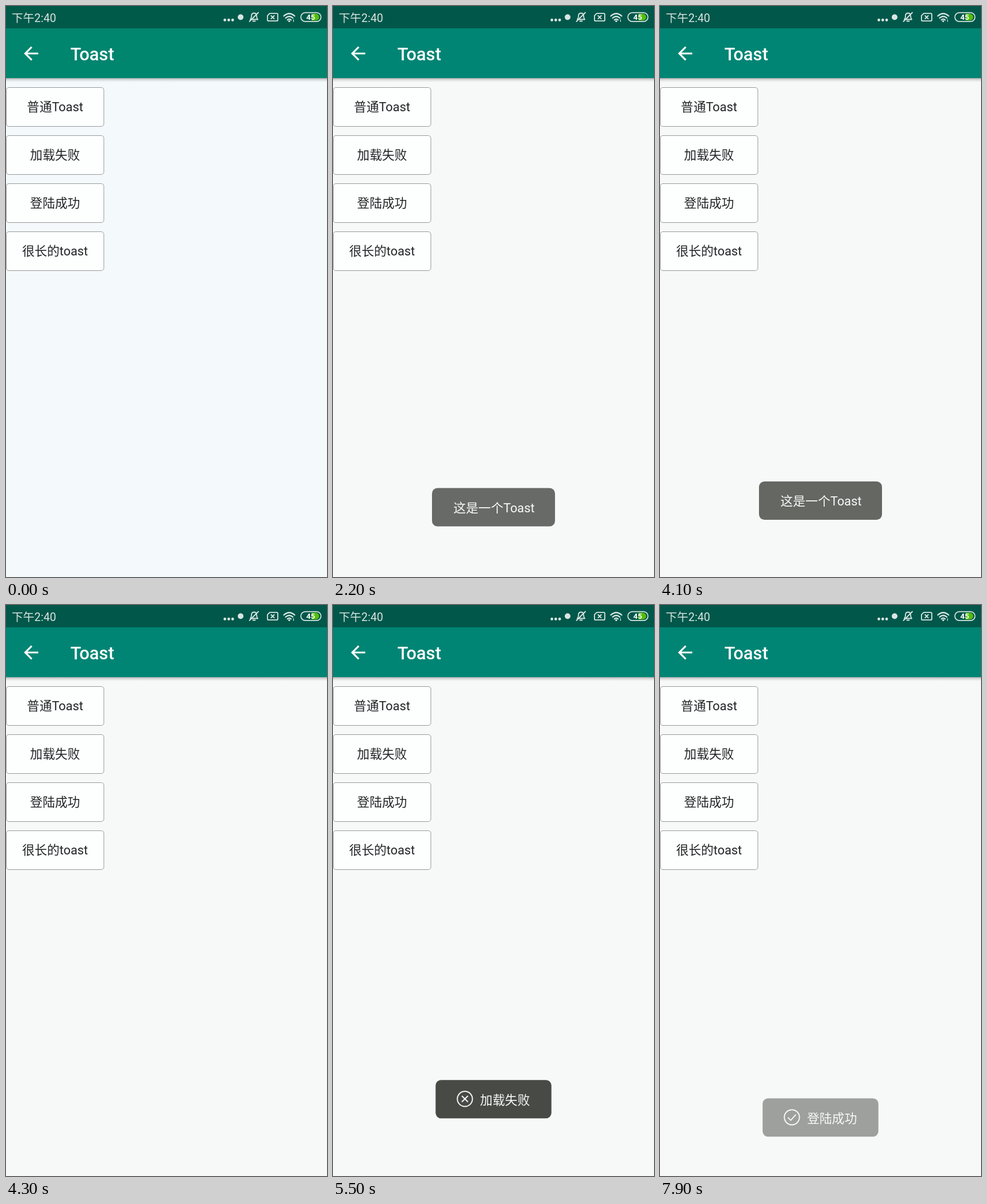
An HTML page for the animation above (8000 ms loop, 561 px wide and 998 px high).

```html
<!DOCTYPE html>
<html lang="zh-CN">
<head>
<meta charset="utf-8">
<title>Toast</title>
<style>
  html, body { margin: 0; width: 100%; height: 100%; overflow: hidden; }
  svg { display: block; width: 561px; height: 998px; }
  text { font: 21.8px Roboto, "Noto Sans CJK SC", "Noto Sans CJK", sans-serif; }
  .label { fill: #222426; text-anchor: middle; }
  .face { fill: #fdfffe; stroke: #979998; }
  .toast rect { fill: #484a46; }
  .toast text { fill: #f8f9f8; }
  .line { fill: none; stroke: #f4f6f5; stroke-width: 2; }
  .status { fill: none; stroke: #d9e6e3; stroke-width: 1.8; stroke-linecap: round; stroke-linejoin: round; }
  .solid { fill: #d9e6e3; stroke: none; }
</style>
</head>
<body>
<svg viewBox="0 0 561 998">
  <defs>
    <linearGradient id="shade" x2="0" y2="1">
      <stop offset="0" stop-color="#000" stop-opacity=".32"/>
      <stop offset=".4" stop-color="#000" stop-opacity=".12"/>
      <stop offset="1" stop-color="#000" stop-opacity="0"/>
    </linearGradient>
  </defs>
  <rect id="page" width="561" height="998"/>
  <rect y="126" width="561" height="7" fill="url(#shade)"/>
  <rect id="bar" y="39" width="561" height="87"/>
  <rect id="top" width="561" height="39"/>

  <text x="10" y="27.5" style="font-size:19.8px" fill="#d9e6e3">下午2:40</text>
  <g class="status">
    <g class="solid">
      <circle cx="382.5" cy="24.5" r="2.4"/>
      <circle cx="389.3" cy="24.5" r="2.4"/>
      <circle cx="396.1" cy="24.5" r="2.4"/>
      <circle cx="410" cy="19.5" r="5"/>
    </g>
    <path d="M427 23.5q2-2 2-6 0-5 4.5-5t4.5 5q0 4 2 6zM431.5 26.5h4M425.500 27L441 11.500"/>
    <path d="M461 12.800h12q2 0 2 2v9.400q0 2-2 2h-14q-2 0-2-2v-7.400zM463.300 17l5.400 5.400m0-5.400l-5.400 5.400"/>
    <path d="M485.500 17.500q9.500-8.500 19 0M488.700 21q6.300-5.600 12.600 0M491.800 24.300q3.200-2.800 6.400 0" stroke-width="2.300"/>
    <circle class="solid" cx="495" cy="26.500" r="1.700"/>
    <path d="M502.500 23.800v3.400" stroke-width="1.200"/>
    <path d="M534 13.500h7.500a5.800 5.800 0 0 1 0 11.800h-7.500z" fill="#55bd0b" stroke="none"/>
    <rect x="515.300" y="11.600" width="35.200" height="15.600" rx="7.800" stroke-width="1.700"/>
  </g>
  <text x="532.500" y="24.400" text-anchor="middle" style="font-size:13.500px;font-weight:700" fill="#fff">45</text>

  <path transform="translate(25.200 64.300) scale(1.558)" fill="#fff"
    d="M20 11H7.830l5.590-5.590L12 4l-8 8 8 8 1.410-1.410L7.830 13H20z"/>
  <text x="112.500" y="95.300" style="font-size:31px;font-weight:500" fill="#fff">Toast</text>
  <g id="buttons"></g>
  <g id="toasts"></g>
</svg>
<script>
const LOOP = 8000, STEP = 100;
const byId = id => document.getElementById(id);
const ring = '<circle class="line" cx="230.5" cy="864" r="13.2"/>';
const icons = {
  cross: ring + '<path class="line" d="M225.200 858.700l10.600 10.600m0-10.600l-10.600 10.600"/>',
  check: ring + '<path class="line" d="M223.500 864.300l5 5 9-10"/>'
};

// press: finger down, release: halfway back, free: fully opaque
const buttons = [
  { label: '普通Toast', press: 1900, release: 2000, free: 2100 },
  { label: '加载失败', press: 4900, release: 5100, free: 5200 },
  { label: '登陆成功', press: 7700, release: 7800, free: 7900 },
  { label: '很长的toast' }
];
const toasts = [
  { text: '这是一个Toast', x: 173, w: 215, textX: 210.5, start: 2027 },
  { text: '加载失败', x: 179.3, w: 202.4, textX: 257, start: 5050, icon: icons.cross },
  { text: '登陆成功', x: 179.3, w: 202.4, textX: 257, start: 7775, icon: icons.check }
];

byId('buttons').innerHTML = buttons.map(({ label }, i) => {
  const y = 142 + i * 84.15;
  return `<g><rect class="face" x=".5" y="${Math.round(y) + .5}" width="170.500" height="68" rx="4.500"/>
    <text class="label" x="85.700" y="${y + 41.500}">${label}</text></g>`;
}).join('');
byId('toasts').innerHTML = toasts.map(({ text, x, w, textX, icon = '' }) =>
  `<g class="toast"><rect x="${x}" y="831" width="${w}" height="67" rx="9.500"/>${icon}
    <text x="${textX}" y="873.300">${text}</text></g>`).join('');

const buttonNodes = [...byId('buttons').children];
const toastNodes = [...byId('toasts').children];

// Quadratic ease in and out over 250 ms
function ease(ms) {
  const u = Math.min(1, Math.max(0, ms / 250));
  return u < .5 ? 2 * u * u : 1 - 2 * (1 - u) ** 2;
}

// Underdamped spring: share of the travel still left
function spring(ms) {
  const s = ms / 1000, a = 10.45 * s;
  return Math.exp(-11 * s) * (Math.cos(a) + 1.053 * Math.sin(a));
}

function pressOpacity({ press, release, free }, t) {
  if (!(t >= press && t < free)) return 1;
  return t < release ? .6 : .85;
}

function draw(t) {
  const cool = t < 2000;
  byId('page').setAttribute('fill', cool ? '#f4f9fc' : '#f7f9f8');
  byId('bar').setAttribute('fill', cool ? '#00856f' : '#008574');
  byId('top').setAttribute('fill', cool ? '#005a4a' : '#00574a');

  buttons.forEach((b, i) => buttonNodes[i].setAttribute('opacity', pressOpacity(b, t)));
  toasts.forEach(({ start }, i) => {
    const age = t - start;
    const shown = ease(age) - ease(age - 2000);
    const node = toastNodes[i];
    node.setAttribute('opacity', shown < .1 ? 0 : shown);
    node.setAttribute('transform', `translate(0 ${age < 0 || age > 700 ? 0 : 97 * spring(age)})`);
  });
}

const origin = performance.now();
function tick() {
  const t = (performance.now() - origin) % LOOP;
  draw(Math.floor(t / STEP) * STEP);
  requestAnimationFrame(tick);
}
tick();
</script>
</body>
</html>
```
